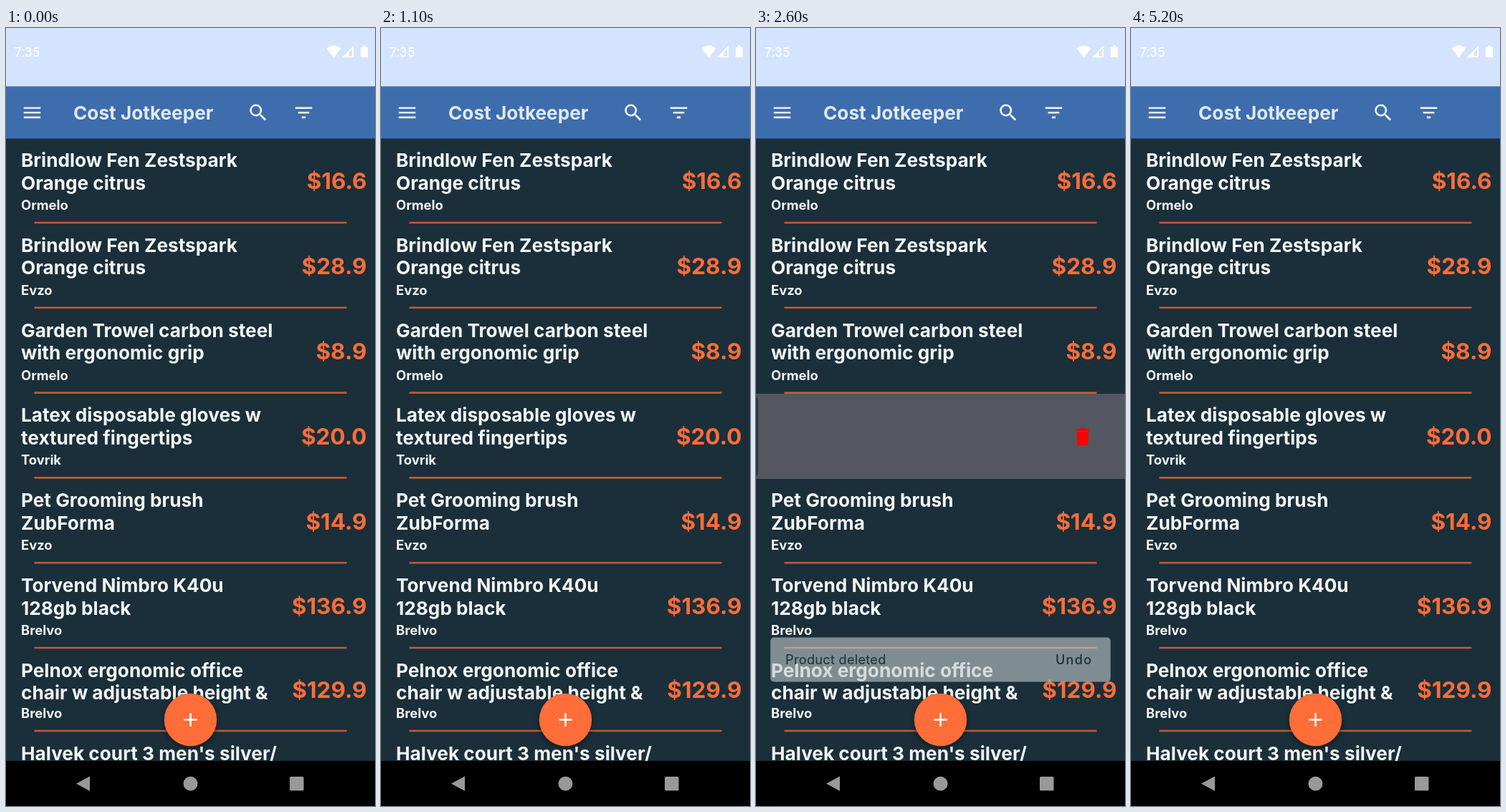
An HTML page with a canvas for the animation above (5300 ms loop, 515 px wide and 1087 px high).

```html
<!DOCTYPE html>
<html lang="en">
<head>
<meta charset="utf-8">
<title>Price list</title>
<style>
html, body { margin: 0; width: 100%; height: 100%; overflow: hidden; background: #000; }
canvas { display: block; width: 515px; height: 1087px; }
</style>
</head>
<body>
<canvas id="stage"></canvas>
<script>
const W = 515, H = 1087, LOOP = 5300, STEP = 100;
const LIST_TOP = 154.7, LIST_END = 1024, ROW_H = 118.8, UNIT = 1.311;
const BG = '#1a2f3a', ORANGE = '#ff6d38', LINE = '#c25a38', PALE = '#f4f6f7';
const REMOVED = 2700, RESTORED = 4100, SNACK_IN = 2510, SNACK_OUT = 4100;

// title lines, store, price, and whether the row is slightly shorter
const rows = [
  ['Brindlow Fen Zestspark', 'Orange citrus', 'Ormelo', '$16.6'],
  ['Brindlow Fen Zestspark', 'Orange citrus', 'Evzo', '$28.9'],
  ['Garden Trowel carbon steel', 'with ergonomic grip', 'Ormelo', '$8.9'],
  ['Latex disposable gloves w', 'textured fingertips', 'Tovrik', '$20.0'],
  ['Pet Grooming brush', 'ZubForma', 'Evzo', '$14.9'],
  ['Torvend Nimbro K40u', '128gb black', 'Brelvo', '$136.9'],
  ['Pelnox ergonomic office', 'chair w adjustable height &', 'Brelvo', '$129.9', true],
  ["Halvek court 3 men's silver/", 'green', 'Ormelo', '$230.0'],
  ['Wrenmoor certitude all', 'season tire', 'Brelvo', '$98.0']
];
const SWIPED = rows[3];

const icons = {
  menu: 'M3 18h18v-2H3zM3 13h18v-2H3zM3 6v2h18V6z',
  search: 'M15.5 14h-.79l-.28-.27A6.47 6.47 0 0 0 16 9.5 6.5 6.5 0 1 0 9.5 16c1.61 0 3.09-.59 4.23-1.57l.27.28v.79l5 4.99L20.49 19zm-6 0a4.5 4.5 0 1 1 0-9 4.5 4.5 0 0 1 0 9z',
  filter: 'M10 18h4v-2h-4zM3 6v2h18V6zM6 13h12v-2H6z',
  add: 'M19 13h-6v6h-2v-6H5v-2h6V5h2v6h6z',
  trash: 'M6 19c0 1.1.9 2 2 2h8c1.1 0 2-.9 2-2V7H6zM19 4h-3.5l-1-1h-5l-1 1H5v2h14z'
};

const canvas = document.getElementById('stage');
const ctx = canvas.getContext('2d');
const dpr = window.devicePixelRatio || 1;
canvas.width = W * dpr;
canvas.height = H * dpr;

const clamp = v => Math.max(0, Math.min(1, v));
const progress = (t, from, to) => clamp((t - from) / (to - from));
const smooth = p => p * p * (3 - 2 * p);
const mix = (a, b, p) => `rgb(${a.map((v, i) => Math.round(v + (b[i] - v) * p))})`;

function along(points, t) {
  let [t0, v0] = points[0];
  for (const [t1, v1] of points) {
    if (t < t1) return v0 + (v1 - v0) * progress(t, t0, t1);
    [t0, v0] = [t1, v1];
  }
  return v0;
}

function text(str, x, y, size, color, { weight = 700, spacing = 0, align = 'left', family = 'Inter' } = {}) {
  ctx.font = `${weight} ${size}px ${family}, sans-serif`;
  ctx.letterSpacing = spacing + 'px';
  ctx.textAlign = align;
  ctx.fillStyle = color;
  ctx.fillText(str, x, y);
}

function rect(x, y, w, h, color, r = 0) {
  ctx.fillStyle = color;
  ctx.beginPath();
  ctx.roundRect(x, y, w, h, r);
  ctx.fill();
}

function disc(x, y, r, color) {
  ctx.fillStyle = color;
  ctx.beginPath();
  ctx.arc(x, y, r, 0, 7);
  ctx.fill();
}

function path(d, color) {
  ctx.fillStyle = color;
  ctx.fill(new Path2D(d));
}

function icon(name, cx, cy, color, scale = 1) {
  ctx.save();
  ctx.translate(cx, cy);
  ctx.scale(UNIT * scale, UNIT * scale);
  ctx.translate(-12, -12);
  path(icons[name], color);
  ctx.restore();
}

function drawRow([line1, line2, store, price, tight], y) {
  text(line1, 21, y + 39.3, 26.2, PALE);
  text(line2, 21, y + 70.8, 26.2, PALE);
  text(store, 21, y + (tight ? 96.3 : 99.3), 18.4, PALE);
  text(price, 503.5, y + (tight ? 68.3 : 70.6), 31.5, ORANGE, { align: 'right' });
  rect(39.5, y + (tight ? 113.2 : 116), 436, 2.6, LINE);
}

function drawSwiped(row, y, t) {
  const x = along([[1100, 0], [1400, 150], [2000, 237], [2300, 300], [2600, 512], [2700, 515]], t);
  if (!x || t >= RESTORED) return drawRow(row, y);
  const armed = smooth(progress(t, 1600, 1850));
  const grow = armed - smooth(progress(t, 2300, 2550));
  const red = [255, 0, 0], grey = [84, 87, 96];
  rect(0, y, W, ROW_H, mix(red, grey, armed));
  icon('trash', 456, y + 60 - 3 * grow, mix(grey, red, armed), 1 + .42 * grow);
  ctx.save();
  ctx.translate(-x, 0);
  rect(0, y, W, ROW_H, mix([26, 47, 58], [36, 60, 69], clamp(x / 40)), 10);
  drawRow(row, y);
  ctx.restore();
}

function drawList(t) {
  rect(0, 154, W, 870, BG);
  ctx.save();
  ctx.beginPath();
  ctx.rect(0, 154, W, LIST_END - 154);
  ctx.clip();
  let y = LIST_TOP;
  for (const row of rows) {
    if (row === SWIPED) {
      if (t >= REMOVED && t < RESTORED) continue;
      drawSwiped(row, y, t);
    } else drawRow(row, y);
    y += row[4] ? 116 : ROW_H;
  }
  ctx.restore();
}

function drawBars() {
  rect(0, 0, W, 82, '#d5e4fe');
  text('7:35', 11.5, 40, 18.4, '#fff', { weight: 400, family: 'Roboto' });
  path('M457.5 41L447.5 28.5Q457.5 20.5 467.5 28.5z', '#fff');
  path('M469 41L485 25V41zM478.5 39.3H483.3V29.2L478.5 34z', '#fff');
  path('M495 27h3v-2.5h4v2.5h3v14h-10z', '#fff');

  rect(0, 81.5, W, 73, '#3e6dad');
  icon('menu', 36.5, 118.3, '#e3ecf8');
  text('Cost Jotkeeper', 94, 128, 26.2, '#e0e9f7');
  icon('search', 352, 118.3, '#f1f5fb');
  icon('filter', 415.5, 118.3, '#f1f5fb');

  rect(0, LIST_END, W, H - LIST_END, '#000');
  path('M98 1055.7L117 1045.5V1066z', '#999');
  disc(257.5, 1055.7, 10, '#999');
  rect(396, 1046, 19.5, 19.5, '#999', 1.5);
}

function drawButton() {
  ctx.save();
  ctx.shadowColor = 'rgba(0,0,0,.4)';
  ctx.shadowBlur = 7 * dpr;
  ctx.shadowOffsetY = 3 * dpr;
  disc(257.5, 966.5, 36.7, ORANGE);
  ctx.restore();
  icon('add', 257.5, 966.5, '#fff');
}

function drawSnackbar(t) {
  const shown = progress(t, SNACK_IN, SNACK_IN + 150) * (1 - progress(t, SNACK_OUT, SNACK_OUT + 75));
  if (!shown) return;
  const scale = 1 - .2 * (1 - shown) ** 2.6;
  ctx.save();
  ctx.translate(257.5, 882.5);
  ctx.scale(scale, scale);
  ctx.translate(-257.5, -882.5);
  ctx.globalAlpha = shown;
  rect(15.7, 851, 483.6, 63, '#c4cbce', 5);
  // the text shares the list's background colour, so it stays solid while the bar fades
  ctx.globalAlpha = 1;
  text('Product deleted', 37, 889, 18.4, BG, { weight: 400, spacing: .33 });
  text('Undo', 421, 889, 18.4, BG, { weight: 500, spacing: 1.3 });
  ctx.restore();
}

function draw(now) {
  const t = Math.floor(now % LOOP / STEP) * STEP;
  ctx.setTransform(dpr, 0, 0, dpr, 0, 0);
  drawList(t);
  drawButton();
  drawSnackbar(t);
  drawBars();
}

const start = performance.now();
function frame() {
  draw(performance.now() - start);
  requestAnimationFrame(frame);
}
frame();
</script>
</body>
</html>
```
